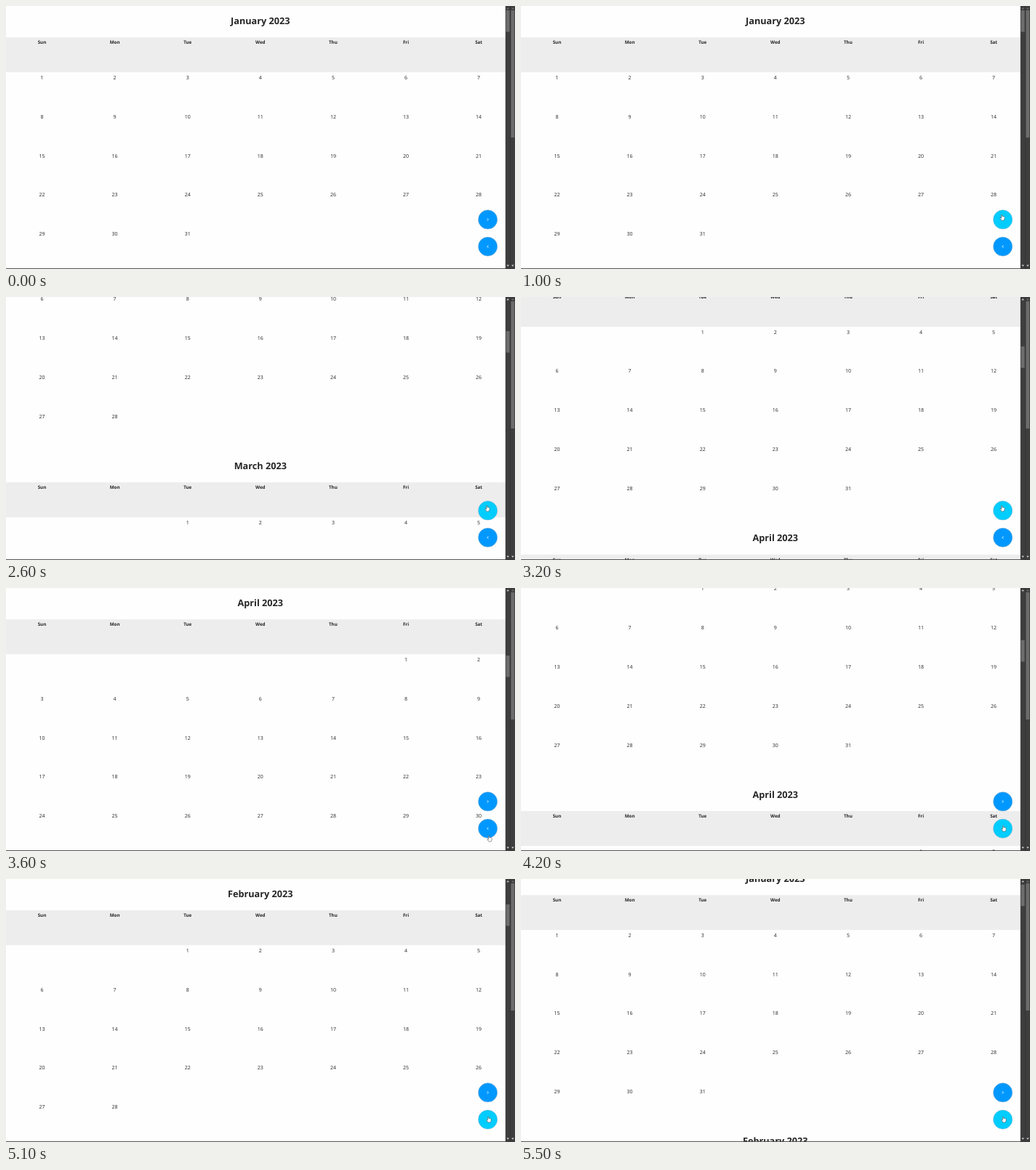
An HTML page that plays this animation: 700 px wide and 362 px high, repeating every 5600 ms.

```html
<!DOCTYPE html>
<html lang="en">
<head>
<meta charset="utf-8">
<title>Scrolling calendar</title>
<style>
  html, body { margin: 0; width: 100%; height: 100%; overflow: hidden; background: #fefefe; }
  svg { display: block; width: 100vw; height: 100vh; }
  text { font-family: "Noto Sans", "Open Sans", sans-serif; text-anchor: middle; fill: #262626; text-rendering: geometricPrecision; }
  .title { font-size: 12.7px; font-weight: 700; }
  .day { font-size: 6.25px; font-weight: 700; }
  .date { font-size: 7px; fill: #333; }
</style>
</head>
<body>
<svg id="stage" viewBox="0 0 700 362" preserveAspectRatio="none"></svg>
<script>
const LOOP = 5600, STEP = 100, PAGE = 361.5, SCROLL_MS = 525;
const DAYS = ['Sun', 'Mon', 'Tue', 'Wed', 'Thu', 'Fri', 'Sat'];
// name, first weekday column, length
const MONTHS = [['January', 0, 31], ['February', 2, 28], ['March', 2, 31], ['April', 5, 30]];
// first visible change, time already elapsed by then, from page, to page
const SCROLLS = [
  [1800, 136, 0, 1], [2400, 36, 1, 2], [3100, 36, 2, 3],
  [4000, 136, 3, 2], [4600, 136, 2, 1], [5200, 136, 1, 0]
];
// time, x, y
const POINTER = [[100, 600, 215], [600, 662, 291], [3300, 662, 291], [3600, 665, 345], [3900, 665, 345], [4000, 664, 331]];

const stage = document.getElementById('stage');
function add(tag, attrs, parent = stage) {
  const el = document.createElementNS('http://www.w3.org/2000/svg', tag);
  for (const key in attrs) el.setAttribute(key, attrs[key]);
  parent.append(el);
  return el;
}
const rect = (x, y, width, height, fill, parent) => add('rect', { x, y, width, height, fill }, parent);
const path = (d, attrs, parent) => add('path', { d, ...attrs }, parent);
function label(str, x, y, cls, parent) {
  add('text', { x, y, class: cls }, parent).textContent = str;
}
const clamp = v => Math.max(0, Math.min(1, v));
const mix = (a, b, p) => a + (b - a) * p;
const columnX = i => 49.5 + 100.1 * i;

function drawMonth([name, first, length], index) {
  const g = add('g', { transform: `translate(0 ${index * PAGE})` }, pages);
  rect(0, 43.2, 687, 48, '#ededed', g);
  label(name + ' 2023', 349.8, 24.8, 'title', g);
  DAYS.forEach((day, i) => label(day, columnX(i), 52.3, 'day', g));
  for (let d = 1; d <= length; d++) {
    const cell = first + d - 1;
    label(d, columnX(cell % 7), 100.8 + 53.85 * Math.floor(cell / 7), 'date', g);
  }
}

function drawButton(y, dir) {
  const circle = add('circle', { cx: 662.6, cy: y, r: 13.1, stroke: '#8fb0c4', 'stroke-width': .5 });
  path(`M${662.6 - dir * .7} ${y - 1.6}l${dir * 1.5} 1.6l${-dir * 1.5} 1.6`, { fill: 'none', stroke: '#fff', 'stroke-width': .9 });
  return circle;
}

function drawArrow(x, y, dir) {
  return path(`M${x - 1.7} ${y + dir}h3.4l-1.7 ${-2 * dir}z`, { fill: '#e4e4e4' });
}

rect(0, 0, 700, 362, '#fefefe');
const pages = add('g', {});
MONTHS.forEach(drawMonth);
const nextButton = drawButton(293.9, 1);
const backButton = drawButton(331.1, -1);

rect(0, 361, 687, 1, '#565656');
rect(686.8, 0, 13.2, 362, '#3e3e3e');
rect(693.2, 0, .6, 362, '#303030');
const thumb = rect(687.6, 6, 5, 29.5, '#6c6c6c');
rect(694.4, 6, 4.8, 175, '#6c6c6c');
const upArrow = drawArrow(690.2, 3.2, 1);
drawArrow(696.9, 3.2, 1).setAttribute('fill', '#777');
drawArrow(690.2, 357.6, -1);
drawArrow(696.9, 357.6, -1);

const pointer = add('g', { fill: '#fff', stroke: '#333', 'stroke-width': .5, 'stroke-linejoin': 'round' });
const arrow = path('M-2 -4v8l1.9-1.7 1.3 2.7 1.2-.6-1.3-2.6h2.5z', {}, pointer);
const hand = path('M-1.4-3.6q.7-.7 1.2 0v2.2q.6-.4 1.1.1.7-.4 1.1.2.9-.2 1.1.6v2.1l-.9 2.4h-3.3l-2-2.8q-.3-1 .6-.8l1.1.8z', {}, pointer);

// cubic-bezier(.42, 0, .58, 1)
function easeInOut(x) {
  let lo = 0, hi = 1, u = .5;
  for (let i = 0; i < 24; i++) {
    u = (lo + hi) / 2;
    if (1.26 * u * (1 - u) ** 2 + 1.74 * u * u * (1 - u) + u ** 3 < x) lo = u; else hi = u;
  }
  return u * u * (3 - 2 * u);
}

function scrollAt(t) {
  let page = 0;
  for (const [at, lag, from, to] of SCROLLS) {
    const p = (t - at + lag) / SCROLL_MS;
    if (t >= at) page = p >= 1 ? to : mix(from, to, easeInOut(p));
  }
  return page * PAGE;
}

function pointerAt(t) {
  const i = POINTER.findIndex(key => key[0] > t);
  if (i < 0) return POINTER[POINTER.length - 1].slice(1);
  if (i === 0) return POINTER[0].slice(1);
  const [t0, x0, y0] = POINTER[i - 1], [t1, x1, y1] = POINTER[i];
  const p = (t - t0) / (t1 - t0);
  return [mix(x0, x1, p), mix(y0, y1, p)];
}

function hover(button, amount) {
  button.setAttribute('fill', `rgb(0 ${Math.round(mix(152, 205, amount))} 255)`);
}

function render(time) {
  const t = Math.floor((time % LOOP) / STEP) * STEP;
  const scroll = scrollAt(t);
  pages.setAttribute('transform', `translate(0 ${-scroll})`);
  thumb.setAttribute('y', 6 + scroll * .0802);
  upArrow.setAttribute('fill', scroll > 0 ? '#e4e4e4' : '#777');

  hover(nextButton, clamp((t - 600) / 300) * clamp((3600 - t) / 200));
  hover(backButton, clamp((t - 3900) / 300));

  const [x, y] = pointerAt(t);
  pointer.setAttribute('transform', `translate(${x} ${y})`);
  pointer.setAttribute('visibility', t < 100 ? 'hidden' : 'visible');
  arrow.setAttribute('display', t < 600 ? 'inline' : 'none');
  hand.setAttribute('display', t < 600 ? 'none' : 'inline');
}

const start = performance.now();
function tick() {
  render(performance.now() - start);
  requestAnimationFrame(tick);
}
tick();
</script>
</body>
</html>
```
